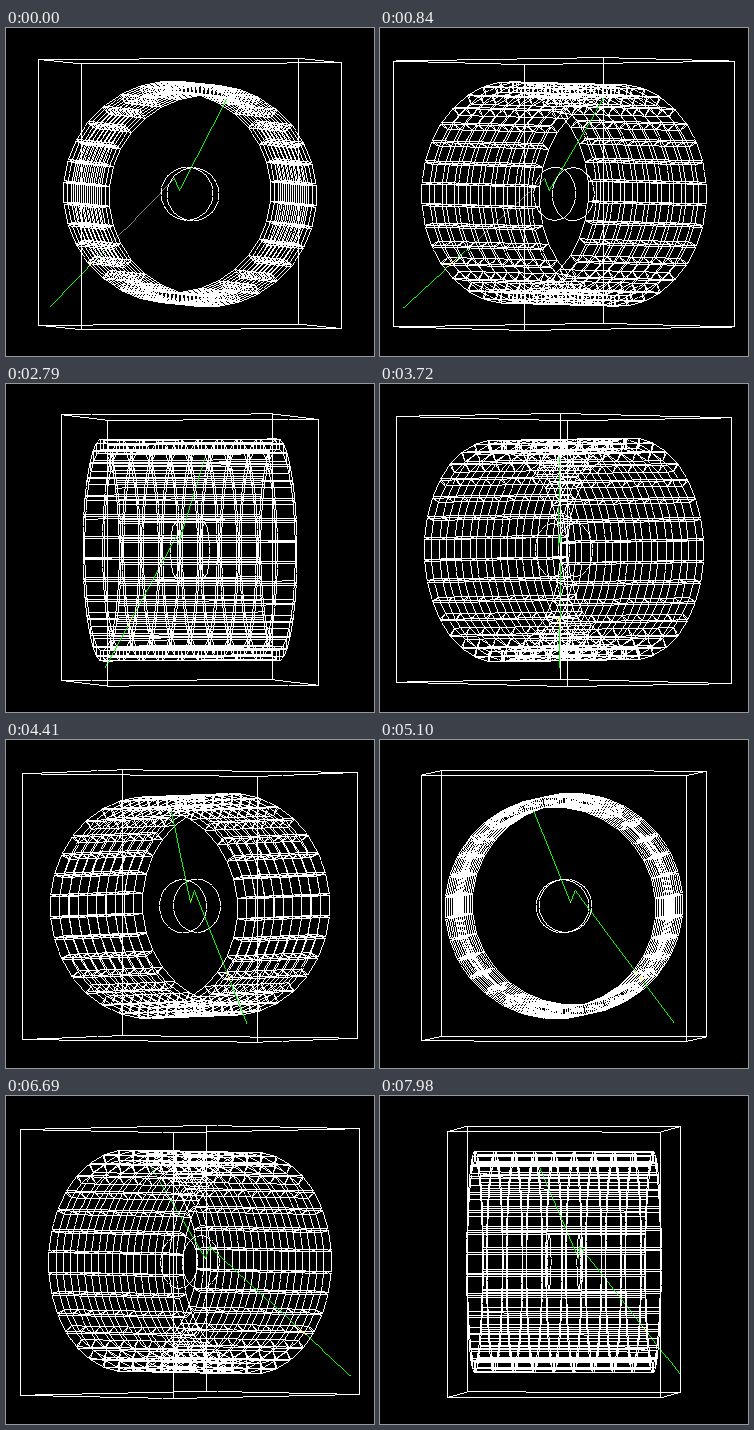
Recreate the animation shown at these times as an HTML page with a canvas. Size 368 by 328 pixels, loop 8 s.

```html
<!DOCTYPE html>
<html lang="en">
<head>
<meta charset="utf-8">
<title>Rotating wireframe detector</title>
<style>
html, body { margin: 0; width: 368px; height: 328px; overflow: hidden; background: #000; }
canvas { display: block; }
</style>
</head>
<body>
<canvas id="stage" width="368" height="328"></canvas>
<script>
const W = 368, H = 328, LOOP = 8000, STEP = 30;
const CX = 183.5, CY = 165.5, TILT = 0.0213;
const WHITE = 0xffffffff, GREEN = 0xff00ff00, YELLOW = 0xff00ffff, GREY = 0xff7c827c;

const ctx = document.getElementById('stage').getContext('2d');
const image = ctx.createImageData(W, H);
const pixels = new Uint32Array(image.data.buffer);
const nearest = new Float32Array(W * H);

// time in ms, turn in degrees
const TURN = [[0, 11.5], [1650, 63.4], [2790, 99.9], [3720, 130], [5100, 174.5], [6690, 225.5], [7980, 265.7]];

const BOX = { x: 132.9, y: 132.9, z: 106.8 };
const BARREL = { outer: 110.5, inner: 100.3, half: 89.3, cells: 9, sectors: 32 };
const CORE = { radius: 26.5, half: 15 };

const END = [-120.6, 114.2, -107], KINK = [-12.8, -15.5, -15];
const ORIGIN = [-7.9, -3.5, -14], TIP = [32.7, -95, 22];

const mix = (a, b, f) => a.map((v, i) => v + (b[i] - v) * f);
const range = n => Array.from({ length: n }, (_, i) => i);

const edges = [];
const add = (a, b, color = WHITE) => edges.push([a, b, color]);

function buildTrack() {
  const hit = f => mix(END, KINK, f);
  add(END, hit(0.31), GREEN);
  add(hit(0.31), hit(0.38), YELLOW);
  add(hit(0.38), hit(0.48), GREEN);
  add(hit(0.48), KINK, GREY);
  add(KINK, ORIGIN, GREEN);
  add(ORIGIN, TIP, GREEN);
  add(mix(KINK, ORIGIN, 0.75), ORIGIN, YELLOW);
}

function buildBox() {
  const { x, y, z } = BOX;
  for (const s of [-1, 1]) for (const t of [-1, 1]) {
    add([-x, s * y, t * z], [x, s * y, t * z]);
    add([s * x, -y, t * z], [s * x, y, t * z]);
    add([s * x, t * y, -z], [s * x, t * y, z]);
  }
}

// Each sector is a straight bar of square-cornered cells, touching its neighbours on the inside only.
function buildBarrel() {
  const { outer, inner, half, cells, sectors } = BARREL;
  const width = inner * Math.tan(Math.PI / sectors);
  const profile = [[inner, -width], [outer, -width], [outer, width], [inner, width]];
  for (const k of range(sectors)) {
    const a = k * 2 * Math.PI / sectors, c = Math.cos(a), s = Math.sin(a);
    const corner = (i, z) => {
      const [r, w] = profile[i % 4];
      return [r * c - w * s, r * s + w * c, z];
    };
    for (const i of range(4)) {
      add(corner(i, -half), corner(i, half));
      for (const n of range(cells + 1)) {
        const z = half * (2 * n / cells - 1);
        add(corner(i, z), corner(i + 1, z));
      }
    }
  }
}

function buildCore() {
  const sides = 48;
  for (const z of [-CORE.half, CORE.half]) {
    const point = k => {
      const a = k * 2 * Math.PI / sides;
      return [CORE.radius * Math.cos(a), CORE.radius * Math.sin(a), z];
    };
    range(sides).forEach(k => add(point(k), point(k + 1)));
  }
}

buildBox();
buildBarrel();
buildCore();
buildTrack();

function turnAt(t) {
  const i = Math.max(1, TURN.findIndex(key => key[0] >= t));
  const [t0, a0] = TURN[i - 1], [t1, a1] = TURN[i];
  return (a0 + (a1 - a0) * (t - t0) / (t1 - t0)) * Math.PI / 180;
}

function line([x0, y0, z0], [x1, y1, z1], color) {
  const n = Math.max(1, Math.round(Math.max(Math.abs(x1 - x0), Math.abs(y1 - y0))));
  for (let i = 0; i <= n; i++) {
    const f = i / n, z = z0 + (z1 - z0) * f;
    const at = Math.round(y0 + (y1 - y0) * f) * W + Math.round(x0 + (x1 - x0) * f);
    if (z < nearest[at]) continue;
    nearest[at] = z;
    pixels[at] = color;
  }
}

function draw(t) {
  const turn = turnAt(t), c = Math.cos(turn), s = Math.sin(turn);
  const project = ([x, y, z]) => {
    const depth = z * c - x * s;
    return [CX + x * c + z * s, CY + y + TILT * depth, depth];
  };
  pixels.fill(0xff000000);
  nearest.fill(-Infinity);
  for (const [a, b, color] of edges)
    line(project(a), project(b), color === GREY && t > 2000 ? GREEN : color);
  ctx.putImageData(image, 0, 0);
}

const start = performance.now();
function tick() {
  const t = (performance.now() - start) % LOOP;
  draw(Math.floor(t / STEP) * STEP);
  requestAnimationFrame(tick);
}
tick();
</script>
</body>
</html>
```
